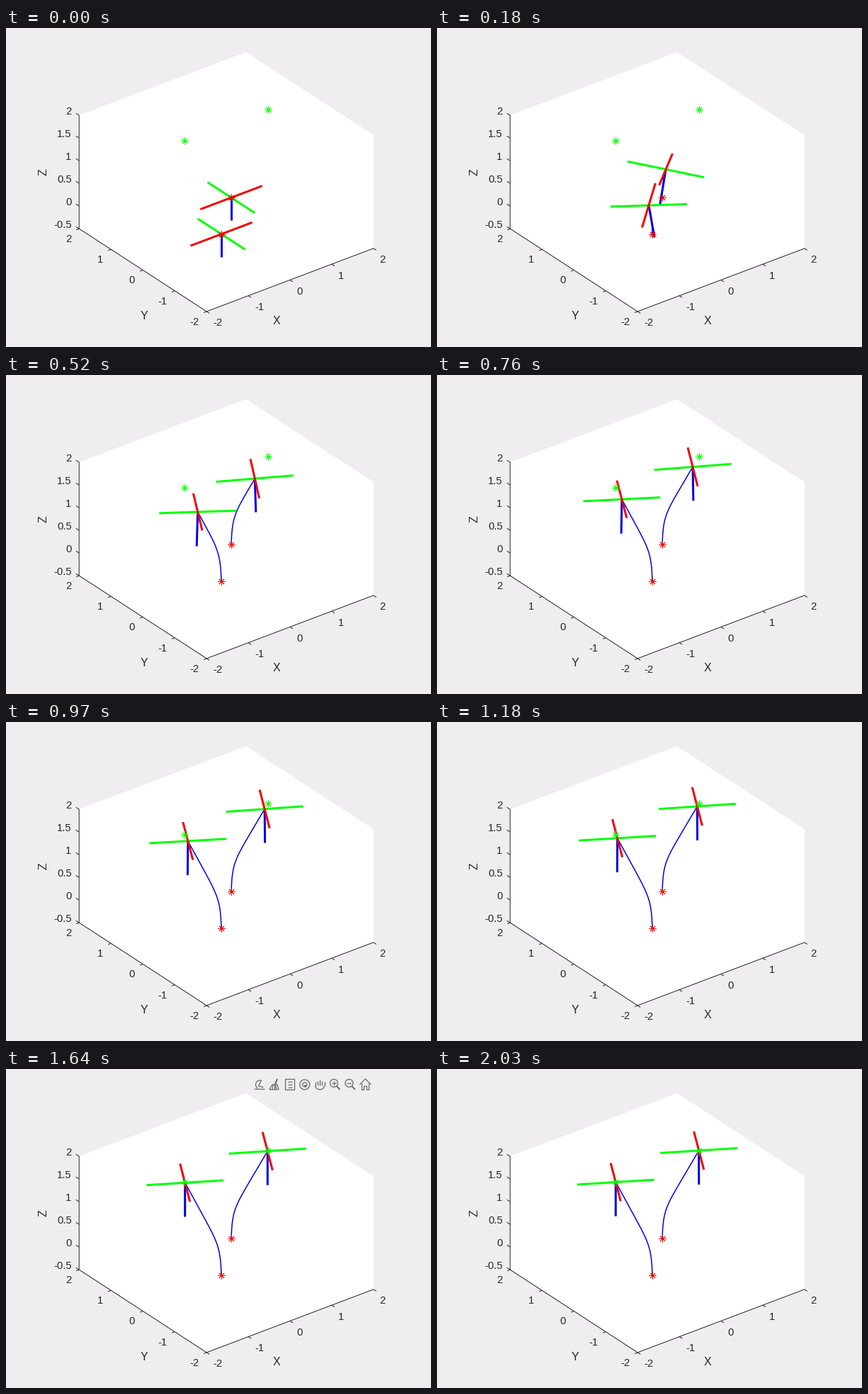
A matplotlib script for the animation above (2.09 s loop, 600 px wide and 450 px high).

```python
import numpy as np
import matplotlib.pyplot as plt
from matplotlib.animation import FuncAnimation
from matplotlib.patches import Polygon

W, H, DPI = 600, 450, 100
LOOP, TICK, STEPS = 2090, 10, 50
PX = 72 / DPI
RED, GREEN, BLUE = "#f00000", "#00ff00", "#0000dc"
INK, GREY = "#262626", "#6e6e6e"
RATE = .124  # closing rate per step

plt.rcParams["font.family"] = "Liberation Sans"
fig = plt.figure(figsize=(W / DPI, H / DPI), dpi=DPI, facecolor="#efedf0")
ax = fig.add_axes([0, 0, 1, 1])
ax.set_xlim(0, W)
ax.set_ylim(H, 0)
ax.axis("off")


def project(p):
    x, y, z = np.moveaxis(np.asarray(p, float), -1, 0)
    return 311 + 58.9 * x - 45 * y, 265 - 22.25 * x - 29.2 * y - 64 * z


def line(xs=(), ys=(), color=INK, width=1.0, z=2):
    return ax.plot(xs, ys, color=color, lw=width * PX, zorder=z,
                   solid_capstyle="butt")[0]


def label(x, y, s, px=14.7, ha="center", va="center_baseline", rotation=0):
    ax.text(x - .6, y - 1, s, fontsize=px * PX, color=INK, ha=ha, va=va,
            rotation=rotation)


def star(p, color):
    x, y = project(p)
    ax.plot([x], [y], marker=(8, 2, 0), ms=10 * PX, mew=.9 * PX,
            mec=color, zorder=9)


def draw_box():
    lo, hi, base = -2, 2, -.5
    outline = [(lo, hi, hi), (hi, hi, hi), (hi, lo, hi),
               (hi, lo, base), (lo, lo, base), (lo, hi, base)]
    ax.add_patch(Polygon(np.column_stack(project(outline)), fc="white", lw=0))
    line(*project([outline[i] for i in (0, 5, 4, 3)]))

    def tick(p, dx, dy):
        x, y = project(p)
        line([x, x + dx], [y, y + dy])
        return x, y

    for v in range(lo, hi + 1):
        x, y = tick((v, lo, base), 4, 2.6)
        label(x + 9.5, y + 16, str(v), ha="left")
        x, y = tick((lo, v, base), -4, 1.6)
        label(x - 10.5, y + 14.5, str(v), ha="right")
    for v in np.arange(base, hi + .1, .5):
        x, y = tick((lo, hi, v), -4.5, -2.7)
        label(x - 10, y - 5.5, f"{v:g}", ha="right")
    label(383, 413, "X", 16)
    label(196, 406, "Y", 16)
    label(54, 204, "Z", 16, va="center", rotation=90)


def draw_toolbar(x0=357.5, y=22, gap=21.4):
    parts = []
    export, brush, tip, orbit, hand, plus, minus, home = x0 + gap * np.arange(8)

    def path(x, *pts, width=1.3):
        xs, ys = np.transpose(pts)
        parts.append(line(x + xs, y + ys, GREY, width, 5))

    def arc(x, dy, r, start=0, stop=360, ry=None):
        a = np.radians(np.linspace(start, stop, 40))
        path(x, *zip(r * np.cos(a), dy + (ry or r) * np.sin(a)))

    # curved arrow over a tray
    arc(export + 1, 0, 6, 120, 290)
    path(export, (3, -6), (-1, 2), (6, 4))
    path(export, (-8, 6), (7, 6))
    # brush
    path(brush, (4, -8), (1, 0), width=2.2)
    path(brush, (-3, 0), (4, 0), (6, 7), (-7, 7), (-3, 0))
    for k in (-3, 0, 3):
        path(brush, (k / 2, 0), (k, 7))
    # note page
    path(tip, (-6, -8), (7, -8), (7, 7), (-6, 7), (-6, -8))
    for dy in (-4, 0, 4):
        path(tip, (-2, dy), (4, dy))
    # orbit
    arc(orbit, 0, 7)
    arc(orbit, 0, 3)
    path(orbit, (0, 0), (0, 3), width=3)
    # open hand
    arc(hand, 1, 6.5, 0, 180, ry=6)
    for k in range(5):
        x = 3.2 * k - 6.4
        path(hand, (x, 1), (x, abs(x) / 2 - 7))
    # zoom in, zoom out
    for x in (plus, minus):
        arc(x - 1.5, -2, 5.5)
        path(x, (2, 2), (7, 7), width=2)
        path(x, (-4.5, -2), (1.5, -2))
    path(plus, (-1.5, -5), (-1.5, 1))
    # home
    path(home, (-8, 0), (0, -8), (8, 0))
    for s in (-1, 1):
        path(home, (5 * s, -2), (5 * s, 7), (2 * s, 7), (2 * s, 2), (0, 2))
    return parts


def lag(n, a, b):
    """Remaining error of two chained first-order lags."""
    return (b * np.exp(-a * n) - a * np.exp(-b * n)) / (b - a)


def drift(n, gain=1.58, p=8):
    """Remaining sideways error: held near one, then a decaying tail."""
    tail = gain * np.exp(-RATE * n)
    return ((1 + gain ** -p) / (1 + tail ** -p)) ** (1 / p)


class Drone:
    def __init__(self, side):
        self.side = side
        self.start = np.array([.5 * side, .5 * side, 0])
        self.goal = np.array([side, 0, 2])
        self.trail = line(color=BLUE, width=1.5, z=3)
        self.leg = line(color=BLUE, width=3, z=4)
        self.arm_y = line(color=GREEN, width=3, z=6)
        self.arm_x = line(color=RED, width=3, z=7)
        star(self.start, RED)
        star(self.goal, GREEN)

    def position(self, n):
        n = np.asarray(n, float)
        left = np.stack([drift(n), drift(n), lag(n, RATE, 1.08)], -1)
        return self.goal + (self.start - self.goal) * left

    def pose(self, n):
        yaw = np.pi / 3 * (1 - lag(n, .385, 1.5))
        # lean into the climb, then slightly back while braking
        lean = (.32 * n * n * np.exp(-.75 * n)
                - .17 * (1 - np.exp(-n / 2)) * np.exp(-RATE * n))
        way = .75 * (np.pi + yaw)
        tilt = -self.side * lean * np.array([np.cos(way), np.sin(way)])
        c = self.position(n)

        def arm(angle):
            d = np.array([np.cos(angle), np.sin(angle)])
            v = .74 * np.append(d, -tilt @ d)
            return project([c - v, c + v])

        self.arm_x.set_data(*arm(yaw))
        self.arm_y.set_data(*arm(yaw - np.pi / 2))
        up = np.append(tilt, 1) / np.sqrt(1 + tilt @ tilt)
        size = .75 - .25 * np.exp(-n)
        self.leg.set_data(*project([c, c - size * up]))
        self.trail.set_data(*project(self.position(np.linspace(0, n, 8 * n + 1))))


draw_box()
toolbar = draw_toolbar()
drones = [Drone(-1), Drone(1)]


def update(i):
    n = min(STEPS - 1, int(i * TICK * STEPS / LOOP + .47))
    for d in drones:
        d.pose(n)
    hover = 7 <= n < 10 or 30 <= n < 45
    for part in toolbar:
        part.set_visible(hover)
    return []


anim = FuncAnimation(fig, update, frames=LOOP // TICK, interval=TICK,
                     repeat=True, repeat_delay=0)
plt.show()
```
